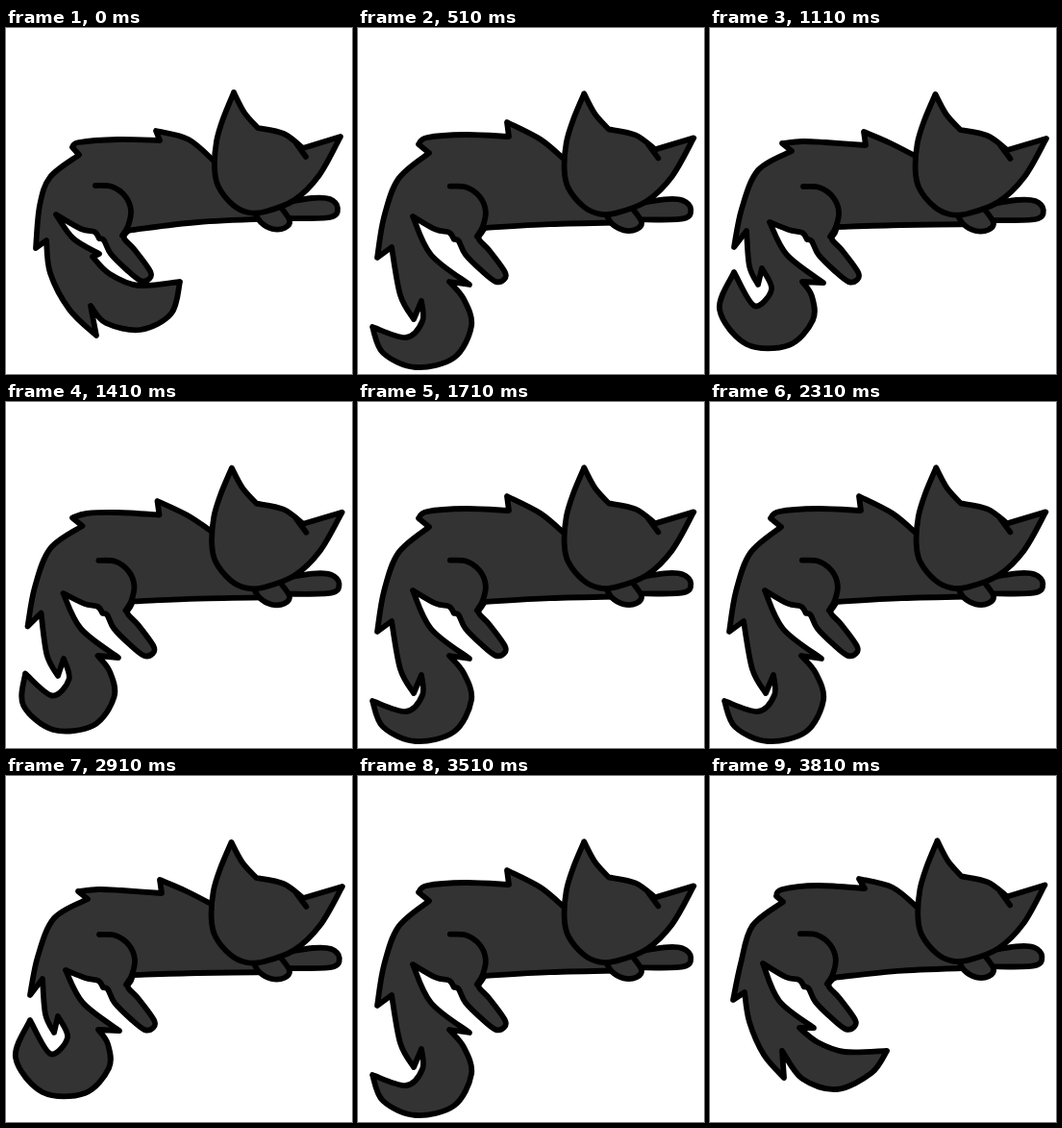
Write an HTML page that moves like this. It is 360 by 360 pixels and loops after 4.11 s.

```html
<!DOCTYPE html>
<html lang="en">
<head>
<meta charset="utf-8">
<title>Sleeping cat</title>
<style>
html, body { margin: 0; width: 100%; height: 100%; overflow: hidden; background: #fff; }
svg { display: block; width: 100%; height: 100%; overflow: hidden; }
#strip {
  fill: #333; stroke: #000; stroke-width: 5.8;
  stroke-linecap: round; stroke-linejoin: round;
  animation: play 4110ms infinite;
}
.line { fill: none; }
/* a short first drawing, then 13 equal ones */
@keyframes play {
  0% { transform: translateX(0); animation-timing-function: step-end; }
  5.109% { transform: translateX(-360px); animation-timing-function: steps(13, end); }
  100% { transform: translateX(-5040px); }
}
</style>
</head>
<body>
<svg viewBox="0 0 360 360"><g id="strip"></g></svg>
<script>
// Points are "x,y"; "!" marks a sharp corner, the rest is a smooth curve.
const parse = text => text.split(' ').map(s => {
  const [x, y] = s.split(',').map(parseFloat);
  return { x, y, sharp: s.endsWith('!') };
});

// Head and legs keep one shape and only drift with the sway of the tail.
const head = parse('237,67! 226,94 219,118 217,146 221,165 236,184 252,192 270,191 300,179 326,153 348,113! 309,125! 289,110 262,104! 248,88 237,67!');
const brow = parse('302,120 312,134');
const farPaw = parse('284,183 318,177 337,178 345,187 337,197 290,198');
const nearPaw = parse('258,190 265,202 277,209 290,208 295,200 284,184');
const thigh = parse('93,164 110,165 124,175 130,190 127,206 121,216');
const leg = parse('78,209 92,212 97,219! 102,221 109,235 126,252 140,263 149,261 150,253 134,231 123,219 126,212');

const pose = (sway, back, tail) => ({ sway, rim: parse(back + ' ' + tail) });

const out = pose(0,
  '218,140 190,116 156,107! 160,117! 116,116 76,119 69,124! 76,132! 46,155 35,185 31,229! 42,221!',
  '46,255 66,293 94,320! 88,289! 104,307 140,314 172,297 181,264! 138,268 108,256 90,238! 97,235! 70,219 52,194!');
const low = pose(0.2,
  '217,138 190,116 155,107! 161,117! 112,114 75,118 69,125! 76,131! 44,156 32,195 24,233! 36,225!',
  '41,256 56,290 77,314! 75,286! 96,315 132,326 168,309 184,286! 140,287 112,277 93,262! 108,262! 72,234 55,195!');
const down = pose(0.7,
  '216,138 190,116 155,98! 157,113! 112,111 72,114 63,121! 74,130! 42,157 27,197 20,239! 35,228!',
  '44,278 58,303! 66,284! 67,305 50,322 15,311! 26,338 60,353 100,343 118,310 110,282 95,264! 116,267! 76,236 57,196!');
const curl = pose(1,
  '217,135 188,120 160,108! 162,122! 120,119 96,118 75,120! 85,128! 50,148 33,188 25,228! 38,211!',
  '41,248 50,267! 54,250! 64,272 46,289 25,254! 10,293 38,329 82,330 107,304 106,279 96,264! 118,265! 80,236 62,202!');

const mean = (a, b) => (a + b) / 2;
const halfway = (a, b) => ({
  sway: mean(a.sway, b.sway),
  rim: a.rim.map((p, i) => ({ ...p, x: mean(p.x, b.rim[i].x), y: mean(p.y, b.rim[i].y) }))
});

// Catmull-Rom curve that stops at sharp corners
function curve(pts) {
  let d = `M${pts[0].x} ${pts[0].y}`;
  for (let i = 0; i < pts.length - 1; i++) {
    const p = pts[i], q = pts[i + 1];
    const before = p.sharp || !i ? p : pts[i - 1];
    const after = q.sharp || !pts[i + 2] ? q : pts[i + 2];
    d += `C${p.x + (q.x - before.x) / 6} ${p.y + (q.y - before.y) / 6} `
      + `${q.x - (after.x - p.x) / 6} ${q.y - (after.y - p.y) / 6} ${q.x} ${q.y}`;
  }
  return d;
}

const shape = (pts, cls = '') => `<path class="${cls}" d="${curve(pts)}"/>`;

function cat({ sway, rim }) {
  const front = pts => pts.map(p => ({ ...p, x: p.x + (p.x - 300) * 0.04 * sway, y: p.y + 2 * sway }));
  const hind = pts => pts.map(p => ({ ...p, x: p.x + 4 * sway, y: p.y + sway }));
  const belly = [
    { x: 132, y: 210 - 3 * sway, sharp: true },
    { x: 200, y: 202 + 3 * sway },
    { x: 285, y: 198 + 6 * sway }
  ];
  return shape(front(farPaw))
    + shape([...rim, ...hind(leg), ...belly])
    + shape(hind(thigh), 'line')
    + shape(front(nearPaw))
    + shape(front(head))
    + shape(front(brow), 'line');
}

const mid = halfway(down, curl);
const order = [out, low, down, mid, curl, mid, down, low, down, mid, curl, mid, down, low];

document.getElementById('strip').innerHTML = order
  .map((p, i) => `<g transform="translate(${i * 360})">${cat(p)}</g>`)
  .join('');
</script>
</body>
</html>
```
